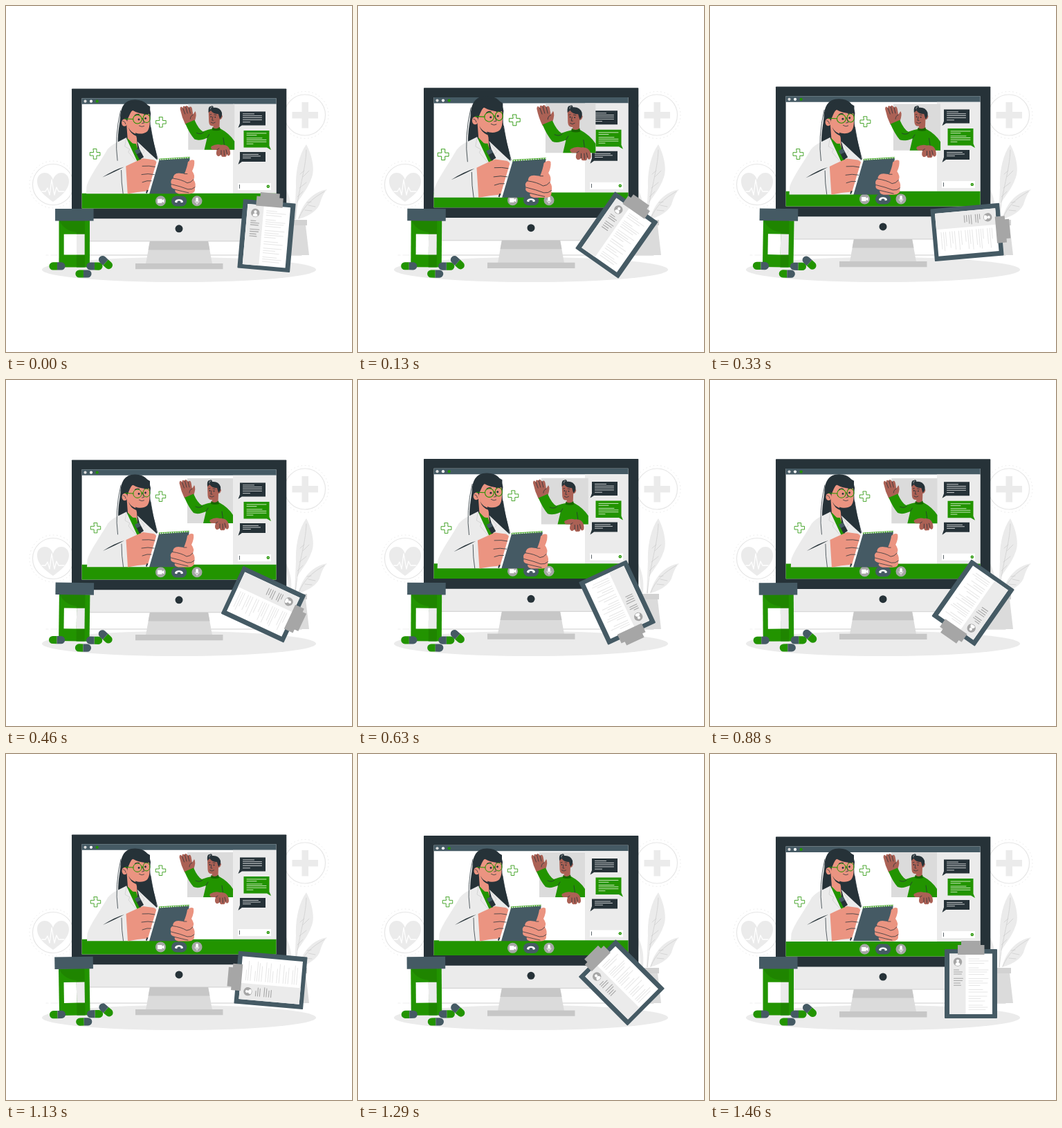
An HTML page that plays this animation: 500x500 px, repeating every 1500 ms.

```html
<!DOCTYPE html>
<html lang="en">
<head>
<meta charset="utf-8">
<title>Online consultation</title>
<style>
html, body { margin: 0; width: 100%; height: 100%; overflow: hidden; background: #fff; }
svg { display: block; width: 100%; height: 100%; }
path, line, circle { stroke-linecap: round; stroke-linejoin: round; }
.dark { fill: #263238; }
.slate { fill: #455a64; }
.green { fill: #229400; }
.pale { fill: #ebebeb; }
.mid { fill: #dbdbdb; }
.grey { fill: #c7c7c7; }
.steel { fill: #a6a6a6; }
.white { fill: #fff; }
.skin { fill: #eb9481; }
.brown { fill: #ab6155; }
.ink, .rule, .shade { fill: none; stroke: #263238; stroke-width: .75; }
.rule { stroke: #fff; }
.shade { stroke: #c7c7c7; stroke-width: .6; }
.lime { fill: none; stroke: #229400; }
</style>
</head>
<body>
<svg viewBox="0 0 500 500">
  <defs>
    <g id="pill">
      <path class="green" d="M0-5.6h-6a5.6 5.6 0 0 0 0 11.2h6z"/>
      <path class="slate" d="M0-5.6h6a5.6 5.6 0 0 1 0 11.2h-6z"/>
    </g>
    <g id="ring" fill="none">
      <circle r="29.5" fill="#fff" stroke="#e6e6e6" stroke-width="1.2"/>
      <circle r="34" stroke="#ebebeb" stroke-dasharray=".8 4.54"/>
    </g>
    <path id="plus" class="lime" stroke-width=".8" d="M-2.3-7.2h4.6v4.9h4.9v4.6h-4.9v4.9h-4.6v-4.900h-4.900v-4.600h4.900z"/>
  </defs>

  <ellipse class="pale" cx="250" cy="381" rx="198" ry="18"/>
  <path d="M58 360h3M65 360h10" stroke="#ebebeb" stroke-width=".8"/>
  <path d="M78 360h349" stroke="#c7c7c7" stroke-width=".9"/>

  <use href="#ring" x="68" y="258"/>
  <path class="pale" d="M68 283C57 275 45 266 45 253C45 239 63 236 68 251C73 236 91 239 91 253C91 266 79 275 68 283Z"/>
  <path class="rule" style="stroke-width:1.3" d="M52 268h5l3-5l3 10l3-22l4 22l3-11l3 6h8"/>
  <use href="#ring" x="432" y="157.5"/>
  <path class="pale" d="M427.5 139h9.500v14h14v9.500h-14v14h-9.500v-14h-14v-9.500h14z"/>

  <g id="plant">
    <path class="pale" d="M434 200C423 215 418 240 419 262L417 308H419L420 285C428 273 437 262 441 250C447 238 443 217 434 200Z"/>
    <path class="pale" d="M464 265C447 268 430 280 422 308C434 305 448 298 453 287C456 278 458 271 464 265Z"/>
    <path class="pale" d="M402 259C409 273 414 285 412 308L408 308C409 290 405 276 402 259Z"/>
    <path class="shade" d="M434 208C433 238 422 266 418 308M429 247l9-9M424 263l10-8M421 276l8-8M431 238l-6 5M460 268C443 278 431 288 423 307M441 283l-6 1M437 288l10 2M432 295l10 1"/>
    <path class="mid" d="M389 317H433L438 360H385Z"/>
    <path class="grey" d="M388 309H435V317H388Z" opacity=".8"/>
  </g>

  <g id="monitor">
    <path class="mid" d="M208 340H292L298 373H202Z"/>
    <path class="grey" d="M208 340H292L294.500 353H205.500Z"/>
    <path class="grey" d="M187 372.500H313.500V380.800H187Z"/>
    <path class="pale" d="M95 307H405V340.500H95Z"/>
    <path d="M95 340.500H405" stroke="#c7c7c7" stroke-width=".8"/>
    <rect class="dark" x="95" y="120" width="310.300" height="187.800" rx=".8"/>
    <circle class="dark" cx="250" cy="322.400" r="5.500"/>
    <path class="white" d="M109.600 133.800H390.500V293H109.600Z"/>
    <path class="slate" d="M109.600 133.800H390.500V142.300H109.600Z"/>
    <circle class="mid" cx="114.500" cy="138.300" r="2.100"/>
    <circle class="white" cx="123" cy="138.300" r="2.100"/>
    <circle class="green" cx="131.700" cy="138.300" r="2.100"/>
    <path class="pale" d="M328 142.300H390.500V271.300H328Z"/>
    <path class="green" d="M109.600 271.300H390.500V293H109.600Z"/>

    <path class="dark" d="M338 153H375V173H341L335.500 176.500L338 170Z"/>
    <path class="green" d="M343.500 180.500H380.500V202.500L383 208.500L377 205H343.500Z"/>
    <path class="dark" d="M338 211.500H375V225.500H341L335.500 229.500L338 222Z"/>
    <path class="rule" d="M342.500 156.500h16M342.500 159.300h27M342.500 162h27M342.500 165h27M342.500 168.300h10M348 184.500h28M348 187.300h14M348 191.500h22M348 194h28M348 196.800h28M348 199.800h9M342.500 215h22M342.500 217.500h25M342.500 220.200h11"/>
    <path class="white" d="M335 256.500H383V266.500H335Z"/>
    <path class="ink" d="M337.500 259v5"/>
    <circle class="green" cx="378.800" cy="261.400" r="2.200"/>
    <circle r=".7" cx="378.800" cy="261.400" fill="#fff"/>

    <circle class="steel" cx="223.500" cy="282.400" r="7.500"/>
    <path class="white" d="M219 279.400h6.500v2l3-1.700v5.400l-3-1.700v2H219z"/>
    <rect class="slate" x="239" y="275" width="22.300" height="15" rx="7.500"/>
    <path class="white" d="M244 284c0-5.500 12-5.500 12 0q-3 1.500-3.700 0v-1.500q-2.300-.8-4.600 0v1.500q-.7 1.500-3.700 0z"/>
    <circle class="steel" cx="276" cy="282.400" r="7.500"/>
    <rect class="white" x="274.300" y="277.400" width="3.500" height="6.500" rx="1.700"/>
    <path class="rule" d="M273 282.400q0 3 3 3t3-3M276 285.400v2"/>
  </g>

  <g id="doctor">
    <use href="#plus" x="129.500" y="213.700"/>
    <use href="#plus" x="223.500" y="168.300"/>
    <path class="dark" d="M187 136.500C171 136 166 148 165.500 162C164 176 161 186 162.500 206L172 212L218.500 223C216 204 211 192 209 176Q207.500 168 209 156C207 144 201 137 187 136.500Z"/>
    <path class="skin" d="M178 154Q192 146 207 157C208 168 208 177 204 181.500C199 186 191 185 187 183.500L189 191L190 206H177L174.500 172Z"/>
    <path class="dark" d="M177 176Q181 184 189 185.500L188 188Q180 185 177 176Z"/>
    <path class="dark" d="M173 167C178 164 178 156 183 151.500Q194 158 208 156.500V146Q190 134 174 145L168 165Z"/>
    <ellipse class="skin" cx="171.500" cy="169" rx="4" ry="5.200"/>
    <path class="ink" d="M169.500 167q3 0 3.500 4"/>
    <g class="lime" stroke-width="1">
      <circle cx="190" cy="164.200" r="6.200"/><ellipse cx="203" cy="163" rx="5" ry="6"/><path d="M172 163.500L184 164M196 163h2"/>
    </g>
    <circle class="dark" cx="192" cy="164.500" r="1.400"/><circle class="dark" cx="201.500" cy="163" r="1.400"/>
    <path class="ink" style="stroke-width:1.100" d="M186.500 158.500q3-2.500 6-1M199.500 157q3-1.500 5 0"/>
    <path class="ink" d="M197.500 164l2 5.500l-3 .5M192.500 173.500q4 2.500 7 .5"/>
    <path class="green" d="M175.500 191L190 206L198 228L180 226Z"/>
    <path class="pale" d="M174 190.500L163 196Q152 201 147 207.500C136 227 121 247 117.500 260L117 270.300H207L219 223L208 213L190 196L197 222L190 225Z"/>
    <path class="green" d="M176 192Q180 200 188 199L193 216L190 224Z"/>
    <path class="shade" d="M174 191l-2 12l7 4l-2 4l13 15M190 197l10 13l-4 4l3 10"/>
    <path class="dark" d="M187 210l6-3l6 11l-6 4z"/>
    <path class="slate" d="M186 209l6-3l3 5l-6 3z"/>
    <path class="ink" d="M167 237Q167 255 169.500 270M166 152Q157 190 161.500 223M209 176Q212 200 219.500 223"/>
    <path class="dark" d="M140 247Q157 236 171 232Q160 238 140 247Z"/>

    <path class="skin" d="M173.500 231Q188 224 198 220L213 222Q221 225 216 235Q221 246 212 251L209 266L190 268L176 270.500Z"/>
    <path class="white" d="M218.500 221L222 221L209 270L204 270Z"/>
    <path class="slate" d="M221 222.500L264.800 219.500Q261 247 253 270.300H207Z"/>
    <path class="dark" d="M203.500 265l2 .5l-2 4.500l-1.500-1z"/>
    <path class="lime" d="M221 221.800L264.500 219.300" stroke-width="2.400" stroke-dasharray=".9 2.300" style="stroke-linecap:butt"/>
    <path class="lime" stroke-width=".7" d="M222 220.800L264.500 218.300"/>
    <path class="ink" d="M197 231Q207 230 215 232M196 243Q205 241 214 243M197 254Q204 251 210 252"/>
    <path class="skin" d="M262 225Q267 220 271 223Q272 230 268 238Q273 245 270 250Q274 256 272 262Q273 270.500 264 270.500H249Q242 269 244 264Q236 262 238.500 257Q236 251 241 248.500Q241 241 249 241L257 242Q261 232 262 225Z"/>
    <path class="ink" d="M241 248.500Q253 250 261 255Q266 255 270 250M239 257Q252 260 262 264Q268 265 272 261M244 264.500Q254 267 263 269M257 242l4 0"/>
  </g>

  <g id="patient">
    <path class="mid" d="M262 142H328V207H262Z"/>
    <path class="brown" d="M258 171Q253 161 250.500 149Q251 143 254.500 148Q254 143 258 145.500Q260 142 263 147Q267 143 268 151L269 157L272 152Q275 156 271 167Z"/>
    <path class="ink" d="M254.500 148l3 8M258.500 146l2.500 9M263 147l2 8M269 157q-4 2-4 6"/>
    <path class="green" d="M258 170L271 164.500Q277 178 283 181Q291 178 297 177H308Q321 184 328 195V207H285L289 190Q278 195 271 192Q264 184 258 170Z"/>
    <path class="ink" d="M289 190l3-5M312 190l2 14M274 183q6 3 10-1"/>
    <path class="brown" d="M291 152Q299 148 307 153L311 159Q310 164 307 164L306.500 177Q301 181 297 176L298 173Q292 174 291.500 167Z"/>
    <path d="M296.500 175Q302 179 307 174.500L308 179Q302 181 296 179Z" fill="#176600"/>
    <path class="dark" d="M291 154Q290 145 294 145Q298 143 298 147Q307 146 310 154Q311 160 307 163L305 156Q297 156 294.500 151Z"/>
    <path d="M294 149q-1-3 2-3" fill="none" stroke="#dbdbdb" stroke-width=".6"/>
    <circle class="dark" cx="294.500" cy="160" r=".9"/><circle class="dark" cx="300.500" cy="160.500" r=".9"/>
    <path class="ink" d="M293 157l2-.5M299 157l3 .5M297 160l-1 5h2M294.500 168q3 2.500 6 0"/>
    <path class="brown" d="M295 202Q302 198 309 200Q318 199 321 206Q323 213 321 215Q318 217 317 213Q317 218 313 217Q309 218 309 214Q305 218 303 215Q301 213 303 207L297 207Q293 205 295 202Z"/>
    <path class="ink" d="M309 214l0-6M313.500 215l-.5-7M317.500 213l-1.500-6M303 207l3-2"/>
  </g>

  <g id="meds">
    <path class="green" d="M76.500 310H121V377.500H76.500Z"/>
    <path d="M77 310H114V377.500H102V327Q84 325 77 310Z" fill="#1f8500"/>
    <path class="white" d="M83.700 329.700H102V359.500H83.700Z"/>
    <path class="pale" d="M102 329.700H113.700V359.500H102Z"/>
    <path class="slate" d="M71 293H126.500V310.500H71Z"/>
    <use href="#pill" x="74" y="376"/>
    <use href="#pill" transform="translate(128 376) rotate(180)"/>
    <use href="#pill" transform="translate(144 370.500) rotate(222)"/>
    <use href="#pill" x="112" y="387"/>
  </g>

  <g id="board">
    <rect class="slate" x="339" y="282" width="76" height="100" rx="1"/>
    <path class="white" d="M346 288.500H408V376H346Z"/>
    <path class="pale" d="M346 288.500H369.500V376H346Z"/>
    <path class="steel" d="M358 276H363V270H391V276H396.500V290H358Z"/>
    <circle class="steel" cx="358" cy="300.500" r="6.200"/>
    <circle class="white" cx="358" cy="299" r="2.100"/>
    <path class="white" d="M354.500 305q0-4 3.500-4t3.500 4q-3.500 2-7 0z"/>
    <path d="M352.500 312h7M352.500 315h12M352.500 318h11M352.500 324.300h13M352.500 327.500h12M352.500 331h9M352.500 334.200h10" fill="none" stroke="#a6a6a6" stroke-width="1.100"/>
    <path d="M374 296h15M374 299h28M374 302.500h22M374 309h14M374 312h28M374 315h26M374 318.500h22M374 324.500h28M374 328h20M374 331h27M374 334.500h16M374 340.500h20M374 344h27M374 350h26M374 353.500h17M374 357h23M374 363h20M374 366h27M374 369.500h24" fill="none" stroke="#e6e6e6"/>
  </g>
</svg>
<script>
const LOOP = 1500, STEPS = 36;
const $ = id => document.getElementById(id);
const pose = (id, transform) => $(id).setAttribute('transform', transform);

// Linear track: [time, value] stops over one loop.
function track(p, stops) {
  const i = Math.max(1, stops.findIndex(([t]) => t >= p));
  const [t0, a] = stops[i - 1], [t1, b] = stops[i];
  return a + (b - a) * (p - t0) / (t1 - t0);
}
const FLOAT = [[0, -.4], [.5, -7], [1, -.4]];
const BEAT = [[0, 1], [.1, 1.1], [.3, 1], [.4, 1], [.5, 1.1], [.6, 1], [1, 1]];
const SWAY = [[0, 0], [.25, 1], [.75, -1], [1, 0]];

const scaleAt = (s, x, y) => `translate(${x} ${y}) scale(${s}) translate(${-x} ${-y})`;

function draw(ms) {
  // 24 poses a second; the last one rests at the end of the loop.
  const n = Math.min(STEPS - 1, Math.floor(ms % LOOP * .024 + .1));
  const p = n === STEPS - 1 ? 1 : (n + .5) / STEPS;
  const beat = track(p, BEAT);
  pose('monitor', `translate(0 ${track(p, FLOAT)})`);
  pose('doctor', scaleAt(beat, 194.5, 203.5));
  pose('patient', scaleAt(beat, 170, 154));
  pose('meds', `rotate(${track(p, SWAY)} 108 343)`);
  pose('board', `rotate(${360 * p} 377 326.5)`);
}

let start;
function tick(now) {
  start ??= now;
  draw(now - start);
  requestAnimationFrame(tick);
}
draw(0);
requestAnimationFrame(tick);
</script>
</body>
</html>
```
